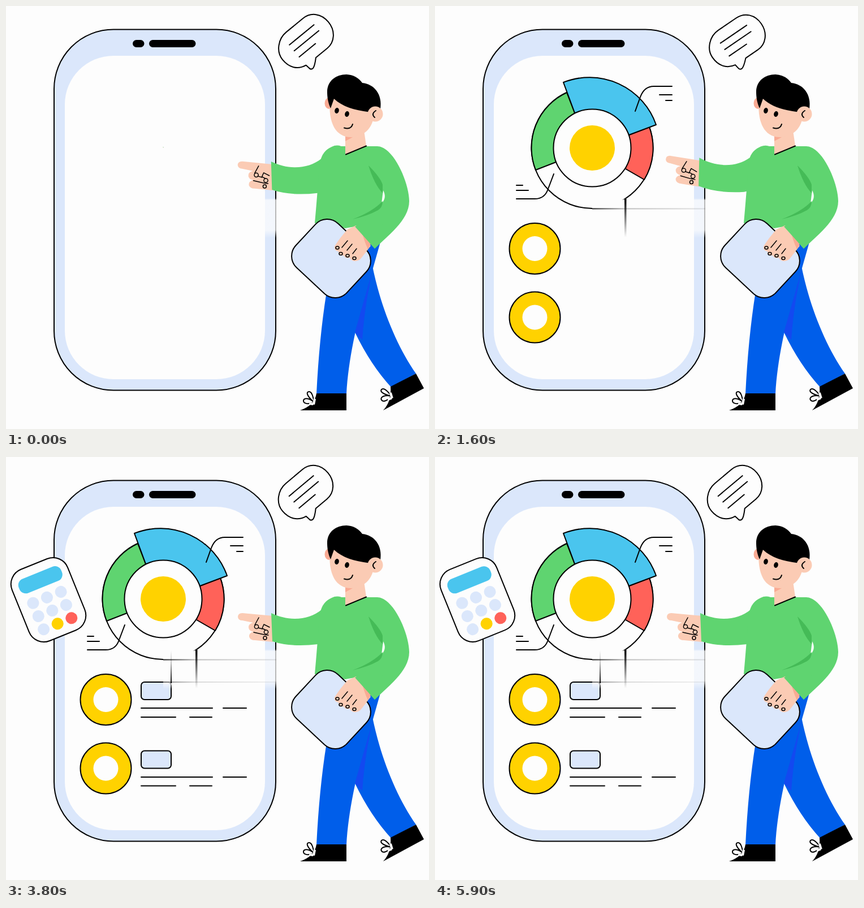
An HTML page for the animation above (6 s loop, 748 by 748 pixels).

```html
<!DOCTYPE html>
<html lang="en">
<head>
<meta charset="utf-8">
<title>Phone wallet</title>
<style>
  html, body { margin: 0; height: 100%; overflow: hidden; background: #fdfdfd; }
  svg { display: block; width: 100vw; height: 100vh; }
  .ink { stroke: #000; stroke-width: 2; stroke-linejoin: round; }
  .line { fill: none; stroke: #000; stroke-width: 2; stroke-linecap: round; stroke-linejoin: round; }
  .thin { stroke-width: 1.5; }
  .draw path { stroke-dasharray: 1 2; }
  .white { fill: #fdfdfd; }
  .pale { fill: #dbe7fb; }
  .green { fill: #5fd470; }
  .shade { fill: #45bb57; }
  .skin { fill: #fbcbb4; }
  .blue { fill: #005eea; }
  .sky { fill: #4ac5ee; }
  .red { fill: #ff6259; }
  .gold { fill: #ffd200; }
</style>
</head>
<body>
<svg viewBox="0 0 748 748">
  <defs>
    <linearGradient id="veil" x2="0" y2="1">
      <stop offset="0" stop-color="#fdfdfd" stop-opacity="0"/>
      <stop offset=".05" stop-color="#fdfdfd"/>
      <stop offset=".8" stop-color="#fdfdfd"/>
      <stop offset="1" stop-color="#fdfdfd" stop-opacity="0"/>
    </linearGradient>
    <linearGradient id="fadeX">
      <stop offset="0" stop-opacity=".85"/><stop offset=".3" stop-opacity=".25"/>
      <stop offset="1" stop-opacity=".1"/>
    </linearGradient>
    <linearGradient id="fadeY" x2="0" y2="1">
      <stop offset="0"/><stop offset=".4" stop-opacity=".6"/><stop offset="1" stop-opacity="0"/>
    </linearGradient>
    <linearGradient id="fadeUp" x2="0" y2="1">
      <stop offset="0" stop-opacity="0"/><stop offset=".4" stop-opacity=".25"/><stop offset="1"/>
    </linearGradient>
    <g id="lace" class="white">
      <path class="line" style="fill:#fdfdfd" d="M545 701C543 691 541 682 536 682S530 688 545 701C535 692 526 693 526 698S533 705 545 701"/>
      <path d="M544 694l4 1-2 10-4-1zM537 701l8 1-2 4-8-1z"/>
    </g>
  </defs>

  <!-- phone -->
  <rect class="pale ink" x="85" y="41.5" width="392" height="638" rx="105"/>
  <rect class="white" x="104" y="88" width="354" height="572" rx="86"/>
  <rect x="224" y="60" width="20.5" height="13" rx="6.5"/>
  <rect x="253" y="60" width="82.5" height="13" rx="6.5"/>

  <g id="donut" class="ink">
    <circle class="white" cx="278" cy="250.5" r="107.5"/>
    <path class="green" d="M178 290A107.5 107.5 0 0 1 233 153L247 189L214 276Z"/>
    <path class="red" d="M379 214A107.5 107.5 0 0 1 370 307L337 288L343 228Z"/>
    <path class="sky" d="M227 135A125 125 0 0 1 391 210L343 228L247 189Z"/>
    <circle class="white" cx="278" cy="251" r="68.5"/>
    <circle class="gold" cx="278" cy="251" r="40" stroke="none"/>
  </g>

  <g id="callouts" class="line draw">
    <path d="M354 186L363 161Q370 142 387 142H419"/>
    <path d="M419 157H397"/><path d="M419 167H408"/>
    <path d="M210 297L199 326Q193 341 176 341H144"/>
    <path d="M144 317H155"/><path d="M144 326H165"/>
  </g>

  <g id="coin1">
    <circle class="gold ink" cx="176.5" cy="429" r="45"/>
    <circle class="white" cx="176.5" cy="429" r="22"/>
  </g>
  <g id="coin2">
    <circle class="gold ink" cx="176.5" cy="550.5" r="45"/>
    <circle class="white" cx="176.5" cy="550.5" r="22"/>
  </g>
  <rect id="tag1" class="pale ink" x="239" y="398" width="53" height="31" rx="6"/>
  <rect id="tag2" class="pale ink" x="239" y="519.5" width="53" height="31" rx="6"/>
  <g id="rows" class="line draw">
    <path d="M239 444H365"/><path d="M384 444H425"/><path d="M239 460H300"/><path d="M325 460H364"/>
    <path d="M239 566H365"/><path d="M384 566H425"/><path d="M239 581.5H300"/><path d="M325 581.5H364"/>
  </g>

  <!-- soft faded strip -->
  <rect x="278" y="340" width="180" height="70" fill="url(#veil)"/>
  <rect x="458" y="340" width="21" height="70" fill="url(#veil)" opacity=".72"/>
  <g id="smear1">
    <rect x="278" y="357.5" width="200" height="2" fill="url(#fadeX)"/>
    <rect x="335" y="341" width="3.5" height="68" fill="url(#fadeY)"/>
  </g>
  <g id="smear2">
    <rect x="278" y="397" width="200" height="2" fill="url(#fadeX)" opacity=".55"/>
    <rect x="291" y="342" width="2" height="58" fill="url(#fadeUp)"/>
  </g>

  <g id="calc">
    <g transform="translate(75 252.5) rotate(-22)">
      <rect class="white ink" x="-53" y="-68" width="106" height="136" rx="28"/>
      <rect class="sky" x="-40.5" y="-51.5" width="81" height="27" rx="12"/>
      <g id="keys"></g>
    </g>
  </g>

  <g id="bubble">
    <path class="white ink" d="M545 33.5H583C601 33.5 614 47 614 67S600 101.500 583 101.500H557Q546 112 541 113Q536 113 536 108L535 101C518 98 509 85 509 67S526 33.500 545 33.500Z"/>
    <path class="line" d="M535 54.5H591M535 68H591M535 82H572"/>
  </g>

  <!-- legs and shoes -->
  <path class="blue" d="M617 577L640 460H648C662 530 690 600 725 650L681 674Q645 635 617 577Z"/>
  <path class="blue" d="M575 400H667L648 467C630 520 606 610 602 686H549Q554 585 567 505Z"/>
  <path fill="#1349f0" d="M648 468L617 577L630 590Q634 530 648 468Z"/>
  <path d="M549 685H602V715H520Q546 706 549 685Z"/>
  <path d="M680 673L725 650L739 676L667 715Q682 699 680 673Z"/>
  <use href="#lace"/>
  <use href="#lace" transform="translate(137 -11) rotate(-28 545 701)"/>

  <!-- pointing arm -->
  <g id="arm">
    <path class="skin" d="M472 281L418 276Q410 276 410 283Q411 289 418 289L437 293Q428 295 429 302Q430 308 438 309Q429 311 430 318Q432 324 440 324L472 327Z"/>
    <path class="line thin" d="M447 284L440 297M446 302L453 304M466 301L456 296L453 303L459 306M438 310L456 314L464 315"/>
    <g class="line thin">
      <circle cx="443" cy="300" r="3.6"/><circle cx="460" cy="309.5" r="3.6"/><circle cx="458" cy="320" r="3"/>
    </g>
    <path class="shade" d="M560 329Q578 318 582 299L590 318Z"/>
    <path class="green" d="M469 276C500 291 535 289 558 270Q562 256 576 249Q588 243 600 252L582 299Q574 326 552 331Q505 337 471 326Z"/>
  </g>

  <!-- torso and right arm -->
  <path class="green" d="M582 248H655C684 246 713 312 713 345C713 380 672 408 652 429L617 390L600 393L546 384Q550 340 554 285Q557 252 582 248Z"/>
  <path class="white" d="M667 326Q674 339 664 349Z"/>
  <path class="shade" d="M641 282Q662 303 666 316V331Q651 315 641 282ZM613 377Q648 364 666 345Q666 356 658 361Q640 371 613 377Z"/>

  <!-- tablet and hand -->
  <rect class="pale ink" x="-61.5" y="-53.5" width="123" height="107" rx="28" transform="translate(575 446.5) rotate(43)"/>
  <path class="skin" d="M619 388L604 395Q591 409 581 425Q580 433 588 434Q588 443 597 441Q600 447 608 445Q611 452 619 451Q625 450 628 446L645 424Z"/>
  <path fill="#f9aa93" d="M630 401L645 421L640 430Q633 415 630 401Z"/>
  <path class="line thin" d="M594 427L604 415M603 432L612 421M613 438L620 429"/>
  <g class="line thin">
    <ellipse cx="586" cy="427.5" rx="3" ry="2.5"/><ellipse cx="592" cy="438" rx="3" ry="2.5"/>
    <ellipse cx="604" cy="441.5" rx="3" ry="2.5"/><ellipse cx="616" cy="446" rx="3" ry="2.5"/>
  </g>
  <path class="green" d="M617 390L652 429L680 402L650 370Z"/>

  <!-- head -->
  <path class="skin" d="M600 226V262L637 247L633 220Z"/>
  <path fill="#f9aa93" d="M600 230L613 232L600 239Z"/>
  <path class="line" d="M601 262.5L637 247.5"/>
  <ellipse cx="571" cy="172" rx="7.5" ry="10" fill="#f9aa93"/>
  <path class="skin" d="M573 165C569 208 584 232 610 232C635 231 652 214 652 180L600 150Z"/>
  <path d="M568 152C568 132 584 121 602 121Q620 122 630 136C651 138 666 156 662 182Q650 178 642 187.500C615 184 595 178 580 164L574 181C569 170 568 160 568 152Z"/>
  <circle class="skin" cx="653" cy="191" r="13.5"/>
  <path class="line" d="M654 185Q645 191 652 197M598 215.500Q610 219 613 209"/>
  <ellipse cx="585" cy="185" rx="3.8" ry="5" transform="rotate(12 585 185)"/>
  <ellipse cx="603" cy="191" rx="3.8" ry="5" transform="rotate(12 603 191)"/>
</svg>
<script>
  const LOOP = 6000, STEP = 100, SWING = 2000;
  const $ = id => document.getElementById(id);
  const clamp = u => Math.min(1, Math.max(0, u));
  const part = (t, start, length) => clamp((t - start) / length);
  const sine = u => (1 - Math.cos(Math.PI * u)) / 2;
  const easeOut = u => 1 - (1 - u) ** 3;

  // Damped spring from 0 to 1
  const spring = (t, start) => {
    const s = Math.max(0, t - start) / 1000;
    return 1 - Math.exp(-5.5 * s) * Math.cos(7 * s);
  };

  function place(id, x, y, scale, angle = 0) {
    $(id).setAttribute('transform',
      `translate(${x} ${y}) rotate(${angle}) scale(${scale}) translate(${-x} ${-y})`);
  }

  function trace(id, u) {
    const group = $(id);
    group.style.display = u > 0 ? '' : 'none';
    for (const path of group.children) path.style.strokeDashoffset = 1 - u;
  }

  const swing = t => {
    const p = (t + 54) % SWING;
    return sine(part(p, 0, 680)) - sine(part(p, 1058, 774));
  };

  function render(t) {
    const s = swing(t);
    place('arm', 584, 248, 1, 30.5 * s);
    place('bubble', 538, 109, 1, -40 + 45.5 * s);

    const grow = easeOut(part(t, 0, 700));
    place('donut', 278, 250, Math.max(grow, .008), -300 * (1 - grow));
    $('smear1').style.opacity = part(grow, .9, .09);

    trace('callouts', sine(part(t, 700, 600)));
    place('coin1', 176.5, 429, easeOut(part(t, 900, 500)));
    place('coin2', 176.5, 550.5, easeOut(part(t, 1000, 500)));
    const tag = easeOut(part(t, 1700, 500));
    place('tag1', 266, 413.5, tag);
    place('tag2', 266, 535, tag);
    $('smear2').style.opacity = part(tag, .85, .14);
    trace('rows', sine(part(t, 2300, 600)));
    place('calc', 75, 252.5, spring(t, 2600));
  }

  for (const path of document.querySelectorAll('.draw path')) path.setAttribute('pathLength', 1);
  for (let i = 0; i < 9; i++) {
    const key = document.createElementNS('http://www.w3.org/2000/svg', 'circle');
    key.setAttribute('cx', (i % 3 - 1) * 26.5 - .8);
    key.setAttribute('cy', Math.floor(i / 3) * 25 - 4.8);
    key.setAttribute('r', 10.5);
    key.setAttribute('class', { 7: 'gold', 8: 'red' }[i] || 'pale');
    $('keys').append(key);
  }

  const began = performance.now();
  function tick() {
    const t = (performance.now() - began) % LOOP;
    render(Math.floor(t / STEP) * STEP);
    requestAnimationFrame(tick);
  }
  tick();
</script>
</body>
</html>
```
